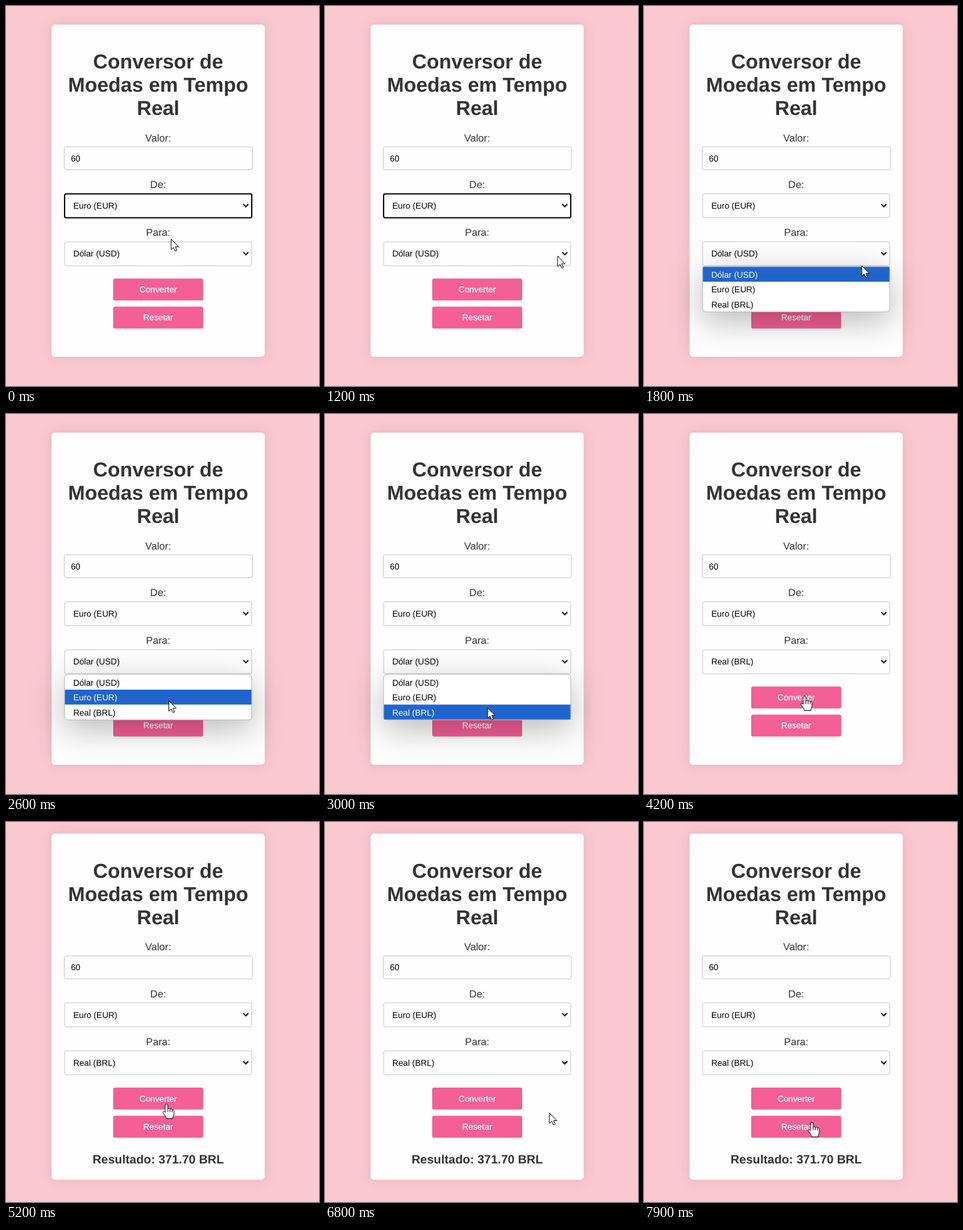
An HTML page that plays this animation: 470x572 px, repeating every 8000 ms.

```html
<!DOCTYPE html>
<html lang="pt">
<head>
<meta charset="utf-8">
<title>Conversor de Moedas</title>
<style>
  html, body { margin: 0; width: 100%; height: 100%; overflow: hidden; background: #fbc8cf; }
  svg { display: block; font: 12.8px "Liberation Sans", Arial, sans-serif; text-rendering: geometricPrecision; }
  .card { fill: #fefefe; filter: drop-shadow(0 0 9px rgba(0, 0, 0, .1)); }
  .mid { text-anchor: middle; fill: #333; }
  .title { font-size: 30.3px; font-weight: bold; }
  .label { font-size: 15.3px; }
  .result { font-size: 18.2px; font-weight: bold; }
  .field { fill: #fefefe; stroke: #c8c8c8; }
  .focused { stroke: #101010; stroke-width: 2; }
  .chevron { fill: none; stroke: #111; stroke-width: 2; }
  .button { fill: #f45f95; }
  .button-text { text-anchor: middle; fill: #fff; stroke: #fff; stroke-width: .25; }
  .list { fill: #fff; stroke: #aaa; stroke-width: .8; filter: drop-shadow(0 14px 25px rgba(0, 0, 0, .27)); }
  .cursor { fill: #fff; stroke: #111; stroke-width: 1; stroke-linejoin: round; }
</style>
</head>
<body>
<svg width="470" height="572" viewBox="0 0 470 572">
  <rect id="card" class="card" x="68.5" width="320" rx="5"/>
  <g id="form">
    <g class="mid title">
      <text x="228.5" y="94.3">Conversor de</text>
      <text x="228.5" y="129.2">Moedas em Tempo</text>
      <text x="228.5" y="164">Real</text>
    </g>
    <g class="mid label">
      <text x="228.5" y="203.5">Valor:</text>
      <text x="228.5" y="274">De:</text>
      <text x="228.5" y="346.3">Para:</text>
    </g>
    <rect class="field" x="87.5" y="212" width="282.5" height="34.5" rx="2.5"/>
    <text x="97.5" y="233.7">60</text>

    <rect id="from" class="field" x="88" y="282.7" width="281" height="36" rx="2.5"/>
    <text x="101" y="305">Euro (EUR)</text>
    <path class="chevron" d="M356.3 298.3l3.8 3.8 3.8-3.8"/>

    <rect id="to" class="field" x="88" y="355" width="281" height="36" rx="2.5"/>
    <text id="toText" x="101" y="377.3"></text>
    <path class="chevron" d="M356.3 370.6l3.8 3.8 3.8-3.8"/>

    <rect class="button" x="161" y="410.2" width="135" height="33" rx="2.5"/>
    <text class="button-text" x="228.5" y="431">Converter</text>
    <rect class="button" x="161" y="452.6" width="135" height="33" rx="2.5"/>
    <text class="button-text" x="228.5" y="473.4">Resetar</text>
    <text id="result" class="mid result" x="228.5" y="524.8">Resultado: 371.70 BRL</text>
  </g>

  <g id="menu">
    <rect class="list" x="88" y="391.8" width="281" height="68.6" rx="5"/>
    <rect id="highlight" x="88.4" width="280.2" height="22.4" fill="#2065cc"/>
    <text class="option" x="101" y="408.6">Dólar (USD)</text>
    <text class="option" x="101" y="431">Euro (EUR)</text>
    <text class="option" x="101" y="453.6">Real (BRL)</text>
  </g>

  <g id="cursor" class="cursor">
    <path id="arrow" d="M0 0V15.8L3.6 12.5 6 18 8.6 16.9 6.3 11.5H11.2z"/>
    <path id="hand" d="M-2 2a2 2 0 0 1 4 0V7.5a1.8 1.8 0 0 1 3.3 .5 1.8 1.8 0 0 1 3.2 .7 1.7 1.7 0 0 1 2.7 1.3V15c0 2-1.5 3.5-1.8 7H0c-.5-3-4-6.5-5.2-9-.8-1.8 1.3-2.8 3.2-.5zM2 7.5V12M5.3 8V12M8.5 8.7V12"/>
  </g>
</svg>
<script>
const LOOP = 8000, STEP = 100;
const OPEN = 1300, CLOSE = 3300, BLUR = 4200, RESULT = 5200;
const SHIFT = 10.4;
const options = [...document.querySelectorAll('.option')];
const el = id => document.getElementById(id);
const show = (id, on) => el(id).style.display = on ? '' : 'none';

// Pointer waypoints: time, x, y
const path = [
  [0, 248, 351], [500, 306, 394], [900, 362, 378], [1300, 345, 376],
  [1800, 327, 391], [2600, 244.5, 431.5], [3100, 244, 445], [3500, 244, 445],
  [3700, 243, 452], [4000, 241, 424.5], [6100, 241, 424.5], [6200, 241, 422],
  [6400, 241, 422], [6600, 290, 415], [6800, 337, 438], [7300, 266, 452],
  [7400, 250, 451.5], [7800, 250, 451.5], [7900, 252, 452], [LOOP, 252, 452]
];

function pointerAt(t) {
  const i = path.findIndex(p => p[0] > t);
  const [t0, x0, y0] = path[i - 1], [t1, x1, y1] = path[i];
  const k = (t - t0) / (t1 - t0);
  return [x0 + (x1 - x0) * k, y0 + (y1 - y0) * k];
}

function render(t) {
  const open = t >= OPEN && t < CLOSE;
  const done = t >= RESULT;
  const shift = done ? SHIFT : 0;
  const [x, y] = pointerAt(t);

  el('card').setAttribute('y', 28 - shift);
  el('card').setAttribute('height', 500 + 2 * shift);
  el('form').setAttribute('transform', `translate(0 ${-shift})`);
  el('from').classList.toggle('focused', t < OPEN);
  el('to').classList.toggle('focused', t >= CLOSE && t < BLUR);
  el('toText').textContent = options[t < CLOSE ? 0 : 2].textContent;
  show('result', done);

  show('menu', open);
  const active = y < 415 ? 0 : y < 437.5 ? 1 : 2;
  el('highlight').setAttribute('y', 392.6 + 22.4 * active);
  options.forEach((o, i) => o.setAttribute('fill', i === active ? '#fff' : '#000'));

  const onButton = !open && x > 161 && x < 296 &&
    [410.2, 452.6].some(top => y > top - shift && y < top - shift + 33);
  show('hand', onButton);
  show('arrow', !onButton);
  el('cursor').setAttribute('transform', `translate(${x} ${y})`);
}

function tick() {
  const t = performance.now() % LOOP;
  render(Math.floor(t / STEP) * STEP);
  requestAnimationFrame(tick);
}
tick();
</script>
</body>
</html>
```
